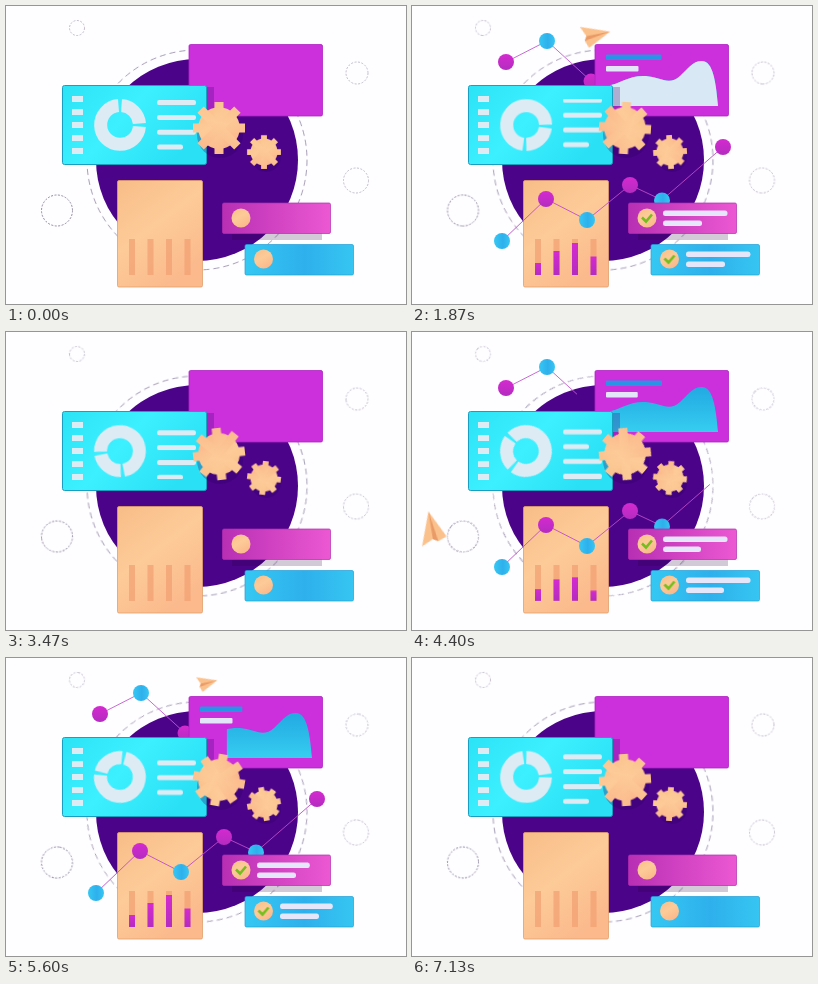
Animation, 400 px wide and 298 px high, one loop 7200 ms. Source, as an HTML page:

```html
<!DOCTYPE html>
<html lang="en">
<head>
<meta charset="utf-8">
<title>Dashboard illustration</title>
<style>
html, body { margin: 0; width: 100%; height: 100%; overflow: hidden; background: #fefdff; }
svg { display: block; width: 400px; height: 298px; }

/* One build-up and take-down lasts 3.6 s; --d is each part's start in it. */
.pop, .grow, .rise, .draw, .wipe {
  animation: 3600ms linear infinite;
  animation-delay: calc(var(--d) - 3600ms);
}
.pop, .grow, .rise, .spin { transform-box: fill-box; }
.pop { animation-name: pop; transform-origin: center; }
.grow { animation-name: grow; transform-origin: left; }
.rise { animation-name: rise; transform-origin: bottom; }
.draw { animation-name: draw; stroke-dasharray: 1 1.02; }
.wipe { animation-name: wipe; }
.spin { transform-origin: center; animation: spin 7200ms linear infinite; }
.back { animation-direction: reverse; }
.scroll { animation: scroll 1800ms linear infinite; }
.first { animation: first 7200ms step-end infinite; }
.fly {
  offset-path: path("M27 225C21 205 12 170 19 144C34 88 100 45 183 29C205 24 230 17 255 17");
  offset-rotate: auto;
  animation: fly 3600ms linear infinite;
}
.size { animation: size 3600ms linear infinite; }

@keyframes pop {
  0% { transform: scale(0); animation-timing-function: ease-out; }
  5.5%, 55.6% { transform: scale(1); animation-timing-function: ease-in; }
  62%, 100% { transform: scale(0); }
}
@keyframes grow {
  0% { transform: scaleX(0); animation-timing-function: ease-in-out; }
  12.5%, 44.4% { transform: scaleX(1); animation-timing-function: ease-in-out; }
  56.9%, 100% { transform: scaleX(0); }
}
@keyframes rise {
  0% { transform: scaleY(0); animation-timing-function: ease-in-out; }
  12.5%, 44.4% { transform: scaleY(1); animation-timing-function: ease-in-out; }
  56.9%, 100% { transform: scaleY(0); }
}
@keyframes draw {
  0% { stroke-dashoffset: 1.01; animation-timing-function: ease-in-out; }
  23.6%, 55.6% { stroke-dashoffset: 0; animation-timing-function: ease-in-out; }
  79.2%, 100% { stroke-dashoffset: -1.01; }
}
@keyframes wipe {
  0% { clip-path: inset(0 100% 0 0); animation-timing-function: ease-in-out; }
  12.5%, 44.4% { clip-path: inset(0 0 0 0); animation-timing-function: ease-in-out; }
  56.9%, 100% { clip-path: inset(0 0 0 100%); }
}
@keyframes spin { to { transform: rotate(360deg); } }
@keyframes scroll { to { transform: translateY(-59.2px); } }
@keyframes first { 0% { opacity: 1; } 50%, 100% { opacity: 0; } }
@keyframes fly {
  0%, 17.5% { offset-distance: 0%; }
  22.2% { offset-distance: 7.8%; }
  27.8% { offset-distance: 22.3%; }
  51.9% { offset-distance: 79.9%; }
  55.6% { offset-distance: 85%; }
  66%, 100% { offset-distance: 97%; }
}
@keyframes size {
  0%, 17.5% { transform: scale(0); }
  21.5%, 40% { transform: scale(1); }
  51.9% { transform: scale(.87); }
  55.6% { transform: scale(.6); }
  66%, 100% { transform: scale(0); }
}
</style>
</head>
<body>
<svg viewBox="0 0 400 298">
  <defs>
    <linearGradient id="peach" x2=".6" y2="1">
      <stop stop-color="#f8bd88"/><stop offset=".5" stop-color="#fdcb98"/><stop offset="1" stop-color="#fbb98c"/>
    </linearGradient>
    <linearGradient id="cyan" x2="1" y2=".5">
      <stop stop-color="#2be3f6"/><stop offset=".5" stop-color="#3df0ff"/><stop offset="1" stop-color="#2ae0f5"/>
    </linearGradient>
    <linearGradient id="pink">
      <stop stop-color="#b82fb4"/><stop offset="1" stop-color="#ec58d2"/>
    </linearGradient>
    <linearGradient id="blue">
      <stop stop-color="#35c8f3"/><stop offset=".55" stop-color="#2eb0ec"/><stop offset="1" stop-color="#36c6f2"/>
    </linearGradient>
    <linearGradient id="sea" x2="0" y2="1">
      <stop stop-color="#22a9e2"/><stop offset="1" stop-color="#36cdf0"/>
    </linearGradient>
    <linearGradient id="violet" x2="0" y2="1">
      <stop stop-color="#d52ad0"/><stop offset="1" stop-color="#b32cc0"/>
    </linearGradient>
    <clipPath id="rows"><path d="M148 93h46v53.3h-46z"/></clipPath>
    <clipPath id="magenta"><path d="M183 38h134v72H183z"/></clipPath>
    <path id="hill" d="M194 100V80C209 78 216 69 234 70C248 71 257 80 268 70C276 63 280 55 290 55C301 55 304 76 306 100Z"/>
    <g id="four">
      <rect x="151" y="94.1" width="39" height="5" rx="2.2"/>
      <rect x="151" y="108.9" width="39" height="5" rx="2.2"/>
      <rect x="151" y="123.7" width="39" height="5" rx="2.2"/>
      <rect x="151" y="138.5" width="26" height="5" rx="2.2"/>
    </g>
    <path id="cross" d="M-4.5-26h9v52h-9zM-26-4.5h52v9h-52z"/>
    <g id="gear">
      <circle r="20.8"/><use href="#cross"/><use href="#cross" transform="rotate(45)"/>
    </g>
    <path id="tick" d="M-5-.5l4 4 6-7" fill="none" stroke="#74bf1e" stroke-width="2.6"/>
  </defs>

  <!-- dashed rings -->
  <g fill="none" stroke="#b3aebd" stroke-width=".8" stroke-dasharray="2 1.5">
    <circle class="spin" cx="71" cy="22" r="7.5"/>
    <circle class="spin" cx="351" cy="67" r="11"/>
    <circle class="spin" cx="350" cy="174.5" r="12.5"/>
    <circle class="spin" cx="51" cy="204.5" r="15.5" stroke="#77708a"/>
    <circle class="spin" cx="191" cy="154" r="110" stroke="#8f86a3" stroke-dasharray="6 4"/>
  </g>
  <circle cx="191" cy="154" r="101" fill="#4b0389"/>

  <!-- upper network -->
  <path class="draw" style="--d:200ms" pathLength="1" d="M94 56L135 35L179 75" fill="none" stroke="#c25bcf" stroke-width=".9"/>
  <circle class="pop" style="--d:160ms" cx="94" cy="56" r="8" fill="url(#violet)"/>
  <circle class="pop" style="--d:550ms" cx="135" cy="35" r="8" fill="url(#blue)"/>
  <circle class="pop" style="--d:890ms" cx="179" cy="75" r="7.5" fill="url(#violet)"/>

  <!-- area chart card -->
  <rect x="183" y="38.5" width="133.5" height="71.5" rx="1.5" fill="#cc2fdc" stroke="#b023c4" stroke-width=".8"/>
  <g class="wipe" style="--d:250ms">
    <use href="#hill" fill="url(#sea)"/>
    <use class="first" href="#hill" fill="#d8e9f5"/>
  </g>
  <rect class="grow" style="--d:250ms" x="194" y="48.5" width="56" height="5.5" rx="1" fill="#2b93e6"/>
  <rect class="grow" style="--d:400ms" x="194" y="60" width="32.5" height="5.5" rx="1" fill="#e3e5f8"/>
  <path d="M190 81h18v80h-18z" fill="#320070" opacity=".25" clip-path="url(#magenta)"/>

  <!-- donut card -->
  <rect x="56.5" y="79.5" width="144" height="79" rx="2" fill="url(#cyan)" stroke="#1a9fc0"/>
  <g fill="#dcebf4">
    <path d="M66 90h11v6H66zM66 103h11v6H66zM66 116h11v6H66zM66 129h11v6H66zM66 142h11v6H66z"/>
    <g clip-path="url(#rows)">
      <g class="scroll"><use href="#four"/><use href="#four" y="59.2"/></g>
    </g>
  </g>
  <g transform="translate(114 119)">
    <g class="spin" style="transform-box:view-box;transform-origin:0 0">
      <path d="M1.5-19.4A19.4 19.4 0 0 1 19.4-1.5M19.4 1.5A19.4 19.4 0 1 1-1.5-19.4" fill="none" stroke="#dcebf4" stroke-width="13"/>
    </g>
  </g>

  <!-- gears -->
  <g fill="#2c0060" opacity=".28">
    <circle cx="214" cy="129" r="23"/><circle cx="260" cy="151" r="15"/>
  </g>
  <g transform="translate(213 122)"><g class="spin" fill="url(#peach)"><use href="#gear"/></g></g>
  <g transform="translate(258 146) scale(.65)"><g class="spin back" fill="url(#peach)"><use href="#gear"/></g></g>

  <!-- bar chart card -->
  <rect x="111.5" y="174.5" width="85" height="106.5" rx="1.5" fill="url(#peach)" stroke="#e0a06c" stroke-width=".8"/>
  <path d="M123 233h6v36h-6zM141.500 233h6v36h-6zM160 233h6v36h-6zM178.500 233h6v36h-6z" fill="#f3a273" opacity=".75"/>
  <g fill="url(#violet)">
    <rect class="rise" style="--d:390ms" x="123" y="257" width="6" height="12"/>
    <rect class="rise" style="--d:450ms" x="141.500" y="245" width="6" height="24"/>
    <rect class="rise" style="--d:510ms" x="160" y="237" width="6" height="32"/>
    <rect class="rise" style="--d:560ms" x="178.500" y="250.500" width="6" height="18.500"/>
  </g>

  <!-- lower network -->
  <path class="draw" style="--d:100ms" pathLength="1" d="M90 235L134 193L175 214L218 179L250 194L311 141" fill="none" stroke="#bd4fc8" stroke-width=".9"/>
  <g fill="url(#blue)">
    <circle class="pop" style="--d:60ms" cx="90" cy="235" r="8"/>
    <circle class="pop" style="--d:457ms" cx="175" cy="214" r="8"/>
    <circle class="pop" style="--d:610ms" cx="250" cy="194.500" r="8"/>
  </g>
  <g fill="url(#violet)">
    <circle class="pop" style="--d:340ms" cx="134" cy="193" r="8"/>
    <circle class="pop" style="--d:560ms" cx="218" cy="179" r="8"/>
    <circle class="pop" style="--d:890ms" cx="311" cy="141" r="8"/>
  </g>

  <!-- list cards -->
  <path d="M226 226h90v8h-90z" fill="#28003c" opacity=".2"/>
  <rect x="216.500" y="197" width="108" height="30.500" rx="1.500" fill="url(#pink)" stroke="#b32bb0" stroke-width=".7"/>
  <rect x="239" y="238.500" width="108.500" height="30.500" rx="1.500" fill="url(#blue)" stroke="#249ed6" stroke-width=".7"/>
  <g fill="url(#peach)">
    <circle cx="235" cy="212" r="9.500"/><circle cx="257.500" cy="253" r="9.500"/>
  </g>
  <g transform="translate(235 212)"><use class="pop" style="--d:350ms" href="#tick"/></g>
  <g transform="translate(257.500 253)"><use class="pop" style="--d:400ms" href="#tick"/></g>
  <g fill="#e6e6fa">
    <rect class="grow" style="--d:270ms" x="251" y="204.500" width="64.500" height="5.500" rx="2.500"/>
    <rect class="grow" style="--d:400ms" x="251" y="214.500" width="39" height="5.500" rx="2.500"/>
    <rect class="grow" style="--d:270ms" x="274" y="245.500" width="64.500" height="5.500" rx="2.500"/>
    <rect class="grow" style="--d:400ms" x="274" y="255.500" width="39" height="5.500" rx="2.500"/>
  </g>

  <!-- paper plane -->
  <g class="fly">
    <g class="size">
      <path d="M18 0L-15-13L-10-1L-13 4L-10 13Z" fill="#fbc18c"/>
      <path d="M18 0L-10-1L-13 4Z" fill="#e99a66"/>
    </g>
  </g>
</svg>
</body>
</html>
```
